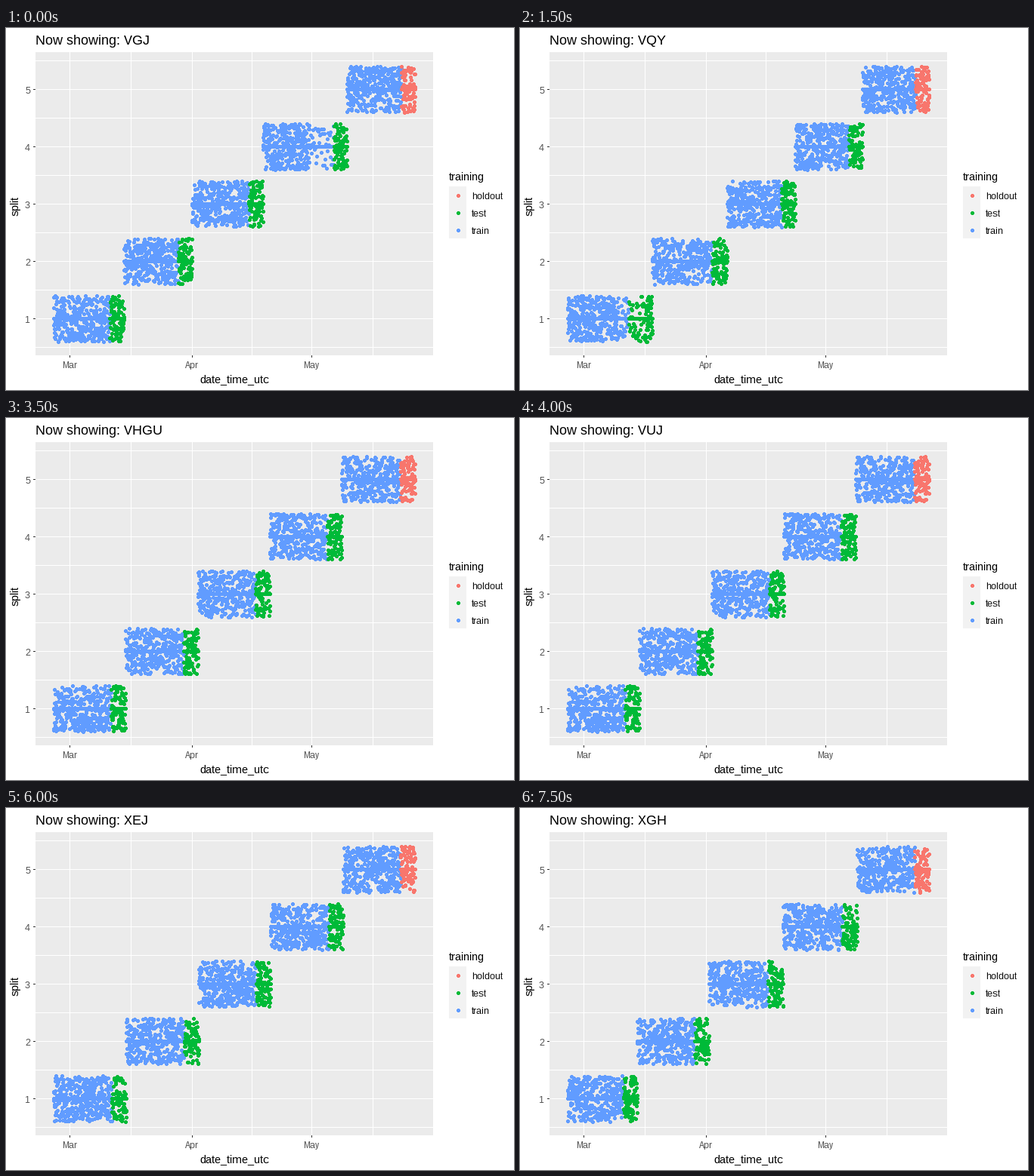
A matplotlib script that plays this animation: 672 px wide and 480 px high, repeating every 8000 ms.

```python
import matplotlib.pyplot as plt
import numpy as np
from matplotlib.animation import FuncAnimation
from matplotlib.patches import Rectangle

plt.rcParams.update({
    "font.family": "Liberation Sans",
    "text.hinting": "native",
    "text.hinting_factor": 1,
})

W, H, DPI = 672, 480, 96
PT = 72 / DPI                      # points per pixel
COLORS = {"holdout": "#F8766D", "test": "#00BA38", "train": "#619CFF"}
TITLES = ["VGJ", "VQY", "VKHE", "VHGU", "VUJ", "VYX", "XEJ", "XGH"]

# Left edge of each split, and an optional thin stretch (split, from, to, density)
FIRST, LAST = 63, 541
STATES = [
    ((156, 246, 340, 451), (3, 401, 433, 0.25)),
    ((158, 254, 349, 445), None),
    ((175, 274, 364, 453), (0, 129, 166, 0.40)),
    ((158, 254, 350, 445), None),
    ((158, 254, 349, 444), None),
    ((158, 254, 349, 445), None),
    ((159, 255, 350, 446), None),
    ((158, 254, 350, 446), None),
    ((155, 250, 348, 446), None),
]
ROWS = 438                         # hourly readings per split
TRAIN_ROWS = int(ROWS * 0.8)
ROW_H = 76


def split_y(k):
    return 81 + ROW_H * (4 - k)


def times(a, b, thin=None):
    u = np.linspace(0, 1, ROWS)
    if thin is None:
        return a + u * (b - a)
    lo, hi, density = thin
    mass = np.cumsum([0, lo - a, density * (hi - lo), b - hi])
    return np.interp(u * mass[-1], mass, [a, lo, hi, b])


def scatter(seed, inner, gap):
    """Points per group: each reading once on its row and once jittered."""
    rng = np.random.default_rng(seed)
    edges = (FIRST, *inner, LAST)
    groups = {name: [] for name in COLORS}
    for k in range(5):
        thin = gap[1:] if gap and gap[0] == k else None
        x = times(edges[k], edges[k + 1], thin)
        y = split_y(k) + 0.3 + rng.uniform(-0.4, 0.4, ROWS) * ROW_H
        late = "holdout" if k == 4 else "test"
        for name, part in (("train", slice(0, TRAIN_ROWS)),
                           (late, slice(TRAIN_ROWS, ROWS))):
            row = np.full(x[part].size, split_y(k))
            groups[name].append((np.tile(x[part], 2),
                                 np.concatenate([row, y[part]])))
    return {name: np.hstack(parts) for name, parts in groups.items()}


CLOUDS = [scatter(seed, *state) for seed, state in enumerate(STATES)]

fig = plt.figure(figsize=(W / DPI, H / DPI), dpi=DPI, facecolor="white")
ax = fig.add_axes([0, 0, 1, 1])
ax.set(xlim=(0, W), ylim=(H, 0))
ax.axis("off")


def box(x, y, w, h, color):
    ax.add_patch(Rectangle((x, y), w, h, fc=color, lw=0, zorder=1))


def label(x, y, text, px, color="black", **kw):
    return ax.text(x, y, text, fontsize=px * PT, color=color,
                   va="baseline", zorder=4, **kw)


# Five-pixel dot with clipped corners
DOT = [(-1, -3), (2, -3), (2, -2), (3, -2), (3, 1), (2, 1),
       (2, 2), (-1, 2), (-1, 1), (-2, 1), (-2, -2), (-1, -2)]


def dots(x, y, color):
    return ax.plot(x, y, ls="", marker=DOT, ms=6 * PT, mew=0,
                   color=color, zorder=3)[0]


# Panel, grid and axes
LEFT, TOP, RIGHT, BOTTOM = 39, 32, 565, 434
box(LEFT, TOP, RIGHT - LEFT, BOTTOM - TOP, "#EBEBEB")
for i in range(11):
    box(LEFT, 43 + i * ROW_H // 2, RIGHT - LEFT, 1, "white")
for x in (84, 165, 246, 325, 404, 485):
    box(x, TOP, 1, BOTTOM - TOP, "white")
for k in range(5):
    box(LEFT - 3, split_y(k), 3, 1, "#333333")
    label(25, split_y(k) + 6, str(k + 1), 12, "#4D4D4D")
for x, month in ((84, "Mar"), (246, "Apr"), (404, "May")):
    box(x, BOTTOM, 1, 3, "#333333")
    label(x, 451, month, 12, "#4D4D4D", ha="center")
label(256, 470, "date_time_utc", 15)
label(20, 246, "split", 15, rotation=90, ha="right")

# Legend
label(586, 202, "training", 15)
box(586, 210, 23, 69, "#F2F2F2")
for i, (name, color) in enumerate(COLORS.items()):
    y = 222 + 23 * i
    dots([598], [y], color)
    label(616, y + 5, name, 12)

title = label(39, 22, "", 18)
layers = {name: dots([], [], COLORS[name])
          for name in ("train", "test", "holdout")}


def update(i):
    # Title and points change on alternate half seconds
    title.set_text("Now showing: " + TITLES[i // 2])
    for name, layer in layers.items():
        layer.set_data(*CLOUDS[(i + 1) // 2][name])
    return [title, *layers.values()]


anim = FuncAnimation(fig, update, frames=16, interval=500,
                     repeat=True, repeat_delay=0, blit=False)
plt.show()
```
